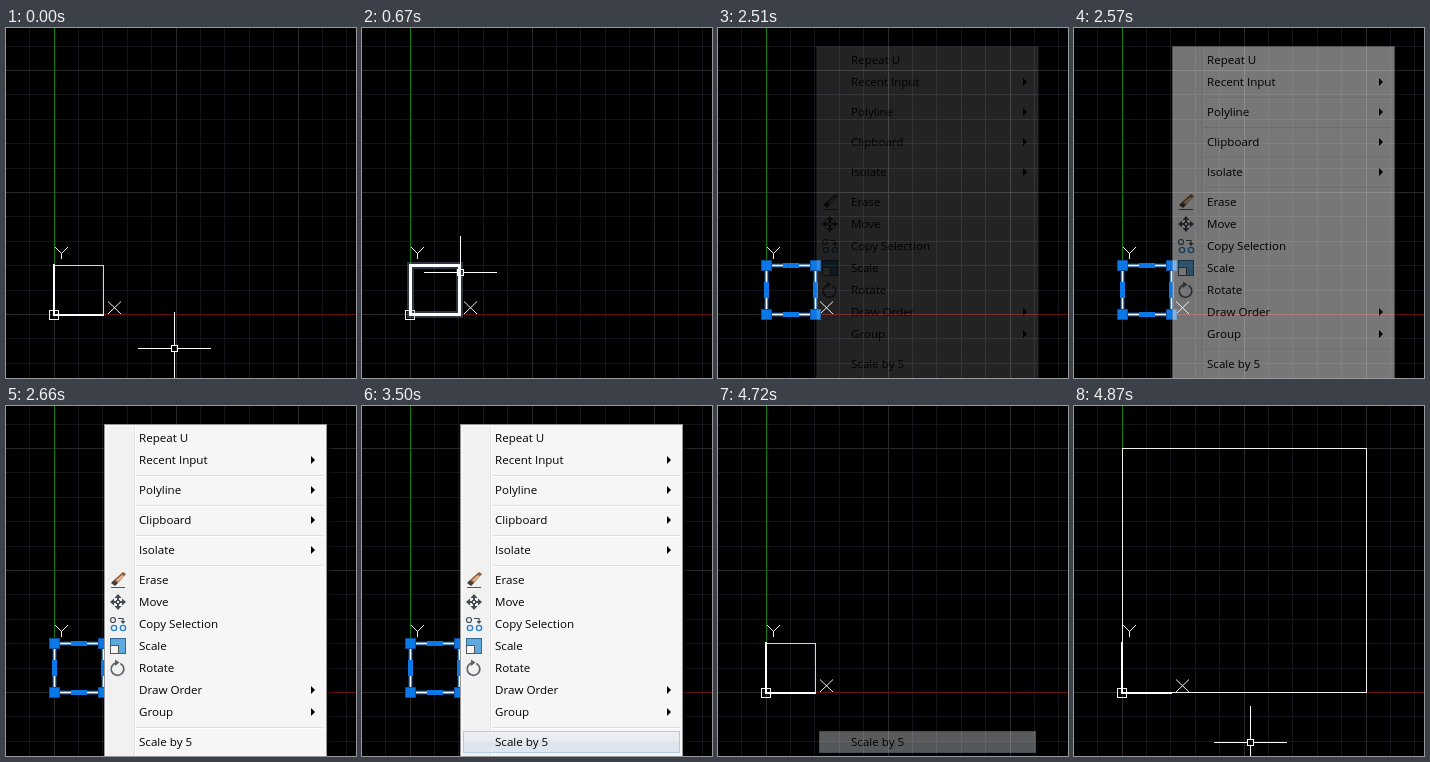
Animation of 350 by 350 pixels, one loop 5930 ms. Source, as an HTML page with a canvas:

```html
<!DOCTYPE html>
<html lang="en">
<head>
<meta charset="utf-8">
<title>Scale from the context menu</title>
<style>
html, body { margin: 0; width: 100%; height: 100%; overflow: hidden; background: #000; }
canvas { display: block; }
</style>
</head>
<body>
<canvas id="stage" width="350" height="350"></canvas>
<script>
const LOOP = 5930, SIZE = 350;
const BLUE = '#0a78e6';
const stage = document.getElementById('stage').getContext('2d');
const layer = document.createElement('canvas');
layer.width = layer.height = SIZE;
const menu = layer.getContext('2d');

// label, row centre, has submenu
const ITEMS = [
  ['Repeat U', 32], ['Recent Input', 54, 1], ['Polyline', 84, 1],
  ['Clipboard', 114, 1], ['Isolate', 144, 1], ['Erase', 174],
  ['Move', 196], ['Copy Selection', 218], ['Scale', 240],
  ['Rotate', 262], ['Draw Order', 284, 1], ['Group', 306, 1],
  ['Scale by 5', 336]
];
const SEPARATORS = [69, 99, 129, 159, 321];

function box(c, color, x, y, w, h) {
  c.fillStyle = color;
  c.fillRect(x, y, w, h);
}

function frame(c, color, x, y, w, h, width = 1) {
  c.strokeStyle = color;
  c.lineWidth = width;
  c.strokeRect(x + .5, y + .5, w, h);
}

function line(c, color, width, ...p) {
  c.strokeStyle = color;
  c.lineWidth = width;
  c.beginPath();
  for (let i = 0; i < p.length; i += 2) c.lineTo(p[i], p[i + 1]);
  c.stroke();
}

function poly(c, color, ...p) {
  c.fillStyle = color;
  c.beginPath();
  for (let i = 0; i < p.length; i += 2) c.lineTo(p[i], p[i + 1]);
  c.fill();
}

function ring(c, color, x, y, r, width, from = 0, to = 7) {
  c.strokeStyle = color;
  c.lineWidth = width;
  c.beginPath();
  c.arc(x, y, r, from, to);
  c.stroke();
}

function drawGrid() {
  box(stage, '#000', 0, 0, SIZE, SIZE);
  for (const major of [false, true]) {
    const color = major ? '#292929' : '#14141a';
    for (let i = -2; i < 14; i++) {
      if ((i % 5 === 0) !== major) continue;
      box(stage, color, Math.floor(48 + i * 24.4), 0, 1, SIZE);
      box(stage, color, 0, Math.floor(286.4 - i * 24.4), SIZE, 1);
    }
  }
  box(stage, '#0a7d0a', 48, 0, 1, 286);
  box(stage, '#6b1010', 49, 286, 301, 1);
}

function drawAxesIcon() {
  const c = '#f0f0f0';
  frame(stage, c, 43, 282, 9, 9);
  box(stage, '#fff', 47, 236, 2, 51);
  box(stage, '#fff', 47, 286, 51, 2);
  line(stage, c, 1, 49, 219, 55.5, 225.5, 62, 219);
  line(stage, c, 1, 55.5, 225, 55.5, 231);
  line(stage, c, 1, 102, 273.5, 115, 286);
  line(stage, c, 1, 115, 273.5, 102, 286);
}

function drawSelection() {
  frame(stage, '#124f96', 48, 237, 49, 49, 4);
  frame(stage, '#fff', 48, 237, 49, 49, 1.6);
  for (const x of [48, 97]) {
    box(stage, BLUE, x - 2, 254, 5, 16);
    for (const y of [237, 286]) {
      box(stage, '#0b4f9c', x - 5, y - 5, 11, 11);
      box(stage, BLUE, x - 4, y - 4, 9, 9);
    }
  }
  for (const y of [237, 286]) box(stage, BLUE, 65, y - 2, 16, 5);
}

function drawCursor(x, y) {
  const c = '#fff';
  box(stage, c, x - 36, y, 33, 1);
  box(stage, c, x + 4, y, 33, 1);
  box(stage, c, x, y - 36, 1, 33);
  box(stage, c, x, y + 4, 1, 33);
  frame(stage, c, x - 3, y - 3, 6, 6);
}

function drawIcons() {
  const dark = '#444b52';
  // eraser
  poly(menu, '#8d5a3a', 117, 166, 120, 168, 112, 177, 108, 174);
  poly(menu, '#e3b88c', 116, 169, 118, 170, 112, 176, 110, 174);
  poly(menu, '#4a3a34', 108, 174, 112, 177, 109, 180, 105, 177);
  line(menu, '#555', 1, 105, 181.5, 119, 181.5);
  // four-way arrow
  for (let i = 0; i < 4; i++) {
    menu.save();
    menu.translate(112, 196);
    menu.rotate(i * Math.PI / 2);
    poly(menu, dark, 0, -8, 3.5, -4, 1, -4, 1, -2, -1, -2, -1, -4, -3.5, -4);
    menu.restore();
  }
  frame(menu, dark, 110, 194, 3, 3);
  // copies
  ring(menu, dark, 107, 214, 2.5, 1.2);
  ring(menu, '#2683c6', 108, 222, 2.6, 1.4);
  ring(menu, '#2683c6', 117, 222, 2.6, 1.4);
  line(menu, dark, 1.2, 112, 212.5, 117, 212.5, 117, 216);
  poly(menu, dark, 114.5, 215, 119.5, 215, 117, 218);
  // nested squares
  box(menu, '#5fa9dc', 104, 232, 16, 16);
  frame(menu, '#35688e', 104, 232, 15, 15);
  box(menu, '#f5f5f5', 104, 239, 9, 9);
  frame(menu, '#555', 104, 239, 8, 8);
  // turning arrow
  ring(menu, '#5c6268', 111.5, 263, 6.3, 1.7, -1.1, 4.5);
  poly(menu, '#5c6268', 109, 253.5, 113.5, 256.5, 109, 260);
}

function drawHighlight(y) {
  const g = menu.createLinearGradient(0, y - 11, 0, y + 11);
  g.addColorStop(0, '#eef0f4');
  g.addColorStop(.45, '#e7eaef');
  g.addColorStop(.55, '#dfe4ea');
  g.addColorStop(1, '#dde9f4');
  box(menu, g, 101, y - 11, 217, 22);
  frame(menu, '#b4cbe0', 101, y - 11, 216, 21);
}

function drawMenu(active) {
  menu.clearRect(0, 0, SIZE, SIZE);
  for (let i = 0; i < 8; i++) box(menu, `rgba(0,0,0,${.75 - i * .09})`, 320 + i, 23, 1, 327);
  box(menu, '#979797', 98, 18, 223, 332);
  box(menu, '#f6f6f6', 99, 19, 221, 331);
  box(menu, '#f1f1f1', 101, 21, 27, 329);
  box(menu, '#e2e3e3', 128, 21, 1, 329);
  box(menu, '#fff', 129, 21, 1, 329);
  for (const y of SEPARATORS) {
    box(menu, '#e0e0e0', 130, y, 188, 1);
    box(menu, '#fff', 130, y + 1, 188, 1);
  }
  if (active) drawHighlight(active);
  drawIcons();
  menu.font = '11.6px "Open Sans", "Noto Sans", sans-serif';
  for (const [label, y, sub] of ITEMS) {
    menu.fillStyle = '#000';
    menu.fillText(label, 133, y + 4);
    if (sub) poly(menu, '#000', 305, y - 4, 309, y, 305, y + 4);
  }
}

function activeRow(t) {
  if (t < 3220) return 0;
  return [262, 284, 306, 0, 336][Math.min(4, Math.floor((t - 3220) / 70))];
}

function pointer(t) {
  if (t >= 4870) return [176, 336];
  const k = t < 130 ? 0 : Math.min(1, (Math.floor((t - 130) / 30) + 1) / 19);
  const e = k * k * (3 - 2 * k);
  const nudge = t < 1030 ? 0 : Math.min(4, Math.floor((t - 1030) / 50) + 1);
  return [Math.round(168 - 70 * e), Math.round(320 - 76 * e) + nudge];
}

function draw(t) {
  const selected = t >= 1710 && t < 4600;
  const scaled = t >= 4840;
  const [x, y] = pointer(t);

  drawGrid();
  if (scaled) frame(stage, '#f0f0e8', 48, 42, 244, 244);
  else frame(stage, '#d2d2ec', 48, 237, 49, 49);
  drawAxesIcon();
  if (selected) drawSelection();
  else if (t < 1710 && x <= 100) {
    frame(stage, 'rgba(130,150,175,.35)', 48, 237, 49, 49, 7);
    frame(stage, '#fff', 48, 237, 49, 49, 3);
  }
  if (t < 2510 || t >= 4870) drawCursor(x, y);

  if (t >= 2510 && t < 4600) {
    drawMenu(activeRow(t));
    stage.globalAlpha = Math.min(1, .14 + .172 * Math.floor((t - 2510) / 30));
    stage.drawImage(layer, 0, 0);
  } else if (t >= 4600 && t < 4840) {
    // the chosen row lingers and fades
    drawMenu(336);
    stage.globalAlpha = Math.max(0, .78 - .1 * Math.floor((t - 4600) / 30));
    stage.drawImage(layer, 101, 325, 217, 22, 101, 325, 217, 22);
  }
  stage.globalAlpha = 1;
}

const start = performance.now();
function tick() {
  draw((performance.now() - start) % LOOP);
  requestAnimationFrame(tick);
}
tick();
</script>
</body>
</html>
```
